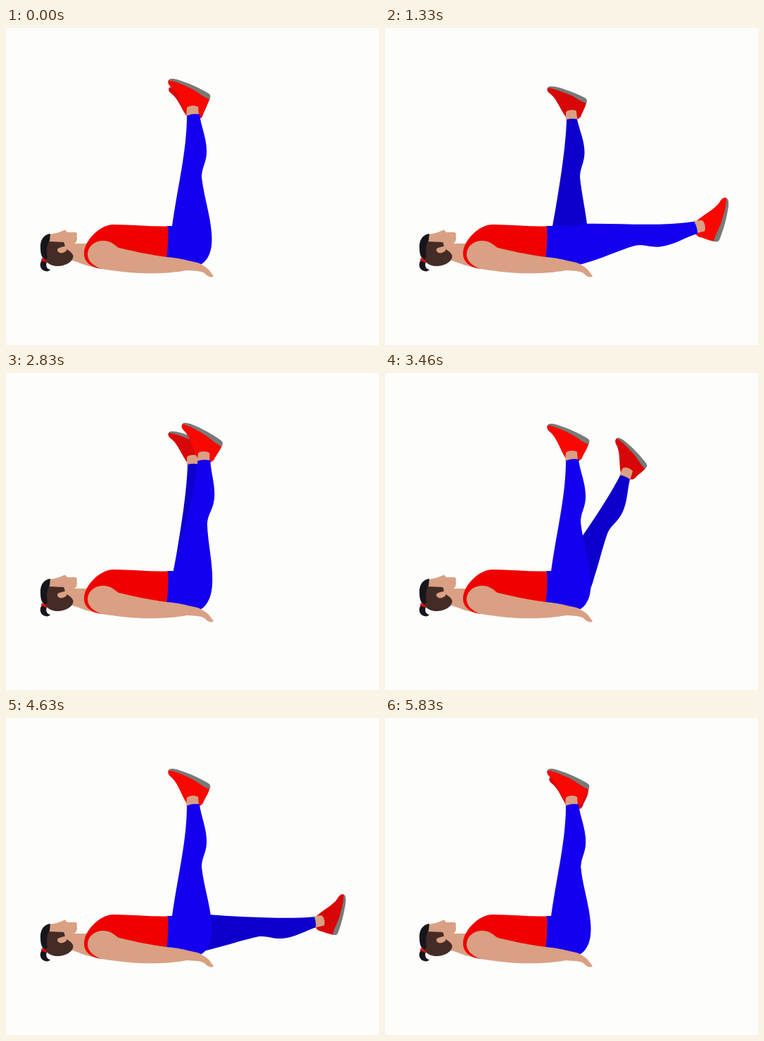
An HTML page that plays this animation: 530x450 px, repeating every 5870 ms.

```html
<!DOCTYPE html>
<html lang="en">
<head>
<meta charset="utf-8">
<title>Alternating leg lowers</title>
<style>
  html, body { margin: 0; width: 100%; height: 100%; overflow: hidden; background: #fdfdfc; }
  svg { display: block; width: 530px; height: 450px; }
  .skin { fill: #d9a084; }
  .pants { fill: #1400ee; }
  .red { fill: #f00000; }
  .sole { fill: #777b78; }
  .dark { fill: #17151c; }
  .brown { fill: #452b25; }
  .shoe { fill: var(--shoe); }
  #near { --shoe: #f80800; }
  #far { --shoe: #d80606; }
  #far .pants { fill: #0e00cc; }
</style>
</head>
<body>
<svg viewBox="0 0 530 450">
  <defs>
    <g id="foot">
      <path class="shoe" d="M231 74C229 78 231 81 236 85C245 94 249 109 256 120L259 123L273 125C277 125 280 122 281 118C284 112 288 106 290 99C270 88 250 74 231 74Z"/>
      <path class="sole" d="M231 74C233 71 238 72 243 73C259 78 275 85 288 93C291 95 291 98 289 101C282 99 274 92 265 87C254 82 243 76 231 74Z"/>
      <path class="skin" d="M256 125L257 113C260 110 268 109 273 112L274 125Z"/>
    </g>
  </defs>

  <g id="far">
    <use href="#foot" transform="translate(231 84) rotate(-3.4) scale(.92) translate(-231 -73)"/>
    <path class="pants" d="M258 130Q265 128 273 129.500C276 145 284 160 283.500 178C283 192 277 199 277 212C279 232 284 255 287 278C290 294 291 311 281 330L262 334Q246 328 240 315L238 281C246 237 257 172 258 130Z"/>
  </g>

  <path class="pants" d="M229 281H262L272 300L280 333L262 336L227 328Z"/>

  <g id="near">
    <use href="#foot"/>
    <path class="pants" d="M257 124.500Q266 121 275 122.500C277 140 286 158 285 178C284 193 278 198 278 212C281 238 290 265 292 290C294 311 290 327 278 335L262 334Q246 328 240 315L236 281C243 229 257 175 257 124.500Z"/>
  </g>

  <path class="skin" d="M62 293C69 292 76 290 80 288L84 286.500L87 290L99 290Q102 292 100.500 295L101 299L100 303Q99 306 95 306H118L138 342C120 340 106 334 92 329L62 318Z"/>
  <path class="brown" d="M60 303L82 304C84 307 83 311 86 314C90 316 94 319 95.500 323C96 332 84 338 73 338C60 338 50 328 52 313Z"/>
  <path class="dark" d="M63 292C53 293 48 302 49 313C49 321 51 326 55 329L59 326C57 316 58 307 62 302Z"/>
  <path class="skin" d="M86 309C82 311 72 311 73 316C75 321 82 320 86 316Z"/>
  <path class="dark" d="M52 328C47 334 48 341 53 344C57 346 61 346 63 343C58 342 56 338 58 332Z"/>
  <path class="red" d="M51 326L58 331L57 333L50 330Z"/>

  <path class="red" d="M111 321C110 303 133 279 153 279C178 279 204 282 230 281.500Q231.500 304 228 328L160 340L136 342C121 340 111 332 111 321Z"/>
  <path class="skin" d="M116 322C116 309 127 302 138 302C149 302 154 308 160 312C177 316 203 322 228 325C245 326 262 331 272 333C278 335 283 339 287 342C291 346 292 349 295 352Q293 355 289 353C285 352 283 348 280 347C273 344 264 345 257 344C241 347 217 349 190 348C170 347 150 344 135 342C125 338 116 331 116 322Z"/>
</svg>
<script>
  const LOOP = 5870, STEP = LOOP / 141, TRAVEL = 1400;
  const legs = [
    { el: document.getElementById("near"), pivot: "260.5 306", swing: 81.5, down: -10, up: 1650 },
    { el: document.getElementById("far"), pivot: "263 306.7", swing: 85, down: 2940, up: 4510 }
  ];

  const ease = u => (1 - Math.cos(Math.PI * Math.min(1, Math.max(0, u)))) / 2;

  function angle(leg, t) {
    // The far leg's return runs slightly past the loop point.
    if (t < leg.up + TRAVEL - LOOP) t += LOOP;
    return leg.swing * (ease((t - leg.down) / TRAVEL) - ease((t - leg.up) / TRAVEL));
  }

  const start = performance.now();
  function draw(now) {
    const elapsed = Math.max(0, now - start) % LOOP;
    const t = Math.floor((elapsed + 8) / STEP) * STEP % LOOP;
    for (const leg of legs)
      leg.el.setAttribute("transform", `rotate(${angle(leg, t).toFixed(3)} ${leg.pivot})`);
    requestAnimationFrame(draw);
  }
  draw(start);
</script>
</body>
</html>
```
